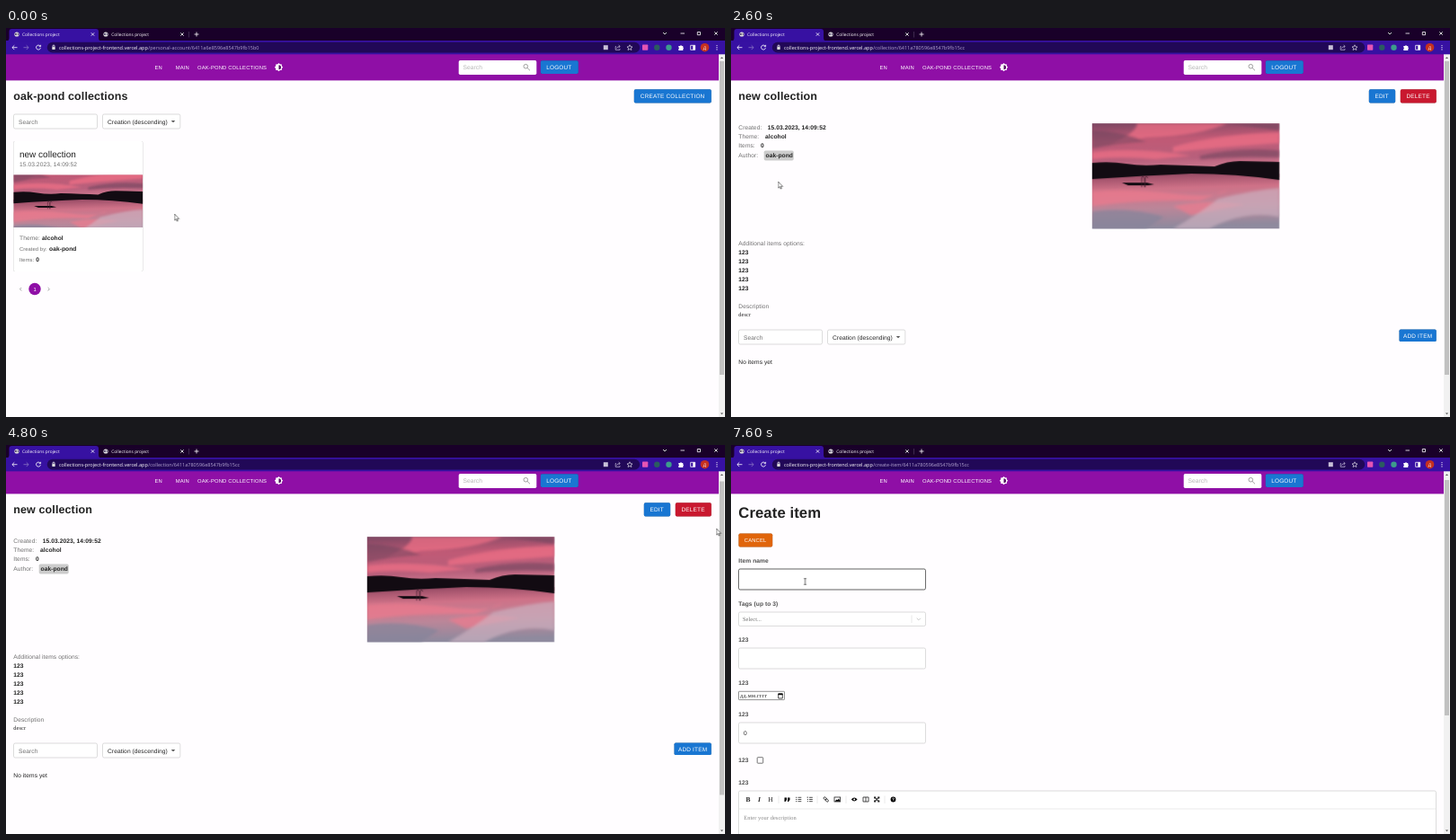
Recreate the animation shown at these times as an HTML page. Size 800x433 px, loop 8000 ms.

```html
<!DOCTYPE html>
<html lang="en">
<head>
<meta charset="utf-8">
<title>Collections project</title>
<style>
@property --scroll { syntax: "<number>"; inherits: true; initial-value: 0; }
html, body { margin: 0; width: 100%; height: 100%; overflow: hidden; background: #fffdff; }
svg.stage { display: block; width: 100vw; height: 100vh; --scroll: 0; animation: scroll 8s linear infinite; }
text { font: 6.667px "Liberation Sans", Arial, sans-serif; letter-spacing: .06px; fill: #222; white-space: pre; }
.ui { font: 4.85px "Open Sans", sans-serif; letter-spacing: 0; fill: #fff; }
.url { font-size: 5.5px; }
.path { fill: #b3a5d0; }
.b { font-weight: 700; }
.dim { fill: #707070; }
.label { font-weight: 700; fill: #505050; }
.h4 { font-size: 12.5px; font-weight: 700; letter-spacing: .11px; }
.h3 { font-size: 16.667px; font-weight: 700; letter-spacing: .1px; }
.h5 { font-size: 10px; letter-spacing: 0; }
.sm { font-size: 5.83px; }
.nav { font-size: 5.83px; letter-spacing: .167px; fill: #fff; }
.btn { font-size: 6.45px; letter-spacing: .18px; fill: #fff; }
.serif { font-family: "Liberation Serif", "Times New Roman", serif; font-size: 6.4px; }
.blue { fill: #1976d2; }
.red { fill: #c9182f; }
.raised { filter: drop-shadow(0 .6px .6px #0006); }
.field { fill: #fff; stroke: #c4c4c4; stroke-width: .6; }
.line { fill: none; stroke: #fff; stroke-width: .8; }
.ink { stroke: #222; }
.grey { stroke: #8a8a8a; }

.scrolled { transform: translateY(calc(var(--scroll) * -1px)); }
.thumb { fill: #c1c1c1; transform: translateY(calc(var(--scroll) * .87px)); }
.list, .spin, .detail, .opened, .form, .early, .arrow, .hand, .beam, .over-edit, .over-add, .over-input
  { animation: 8s step-end infinite; }
.list { animation-name: list; }
.spin { animation-name: spin; }
.detail { animation-name: detail; }
.opened { animation-name: opened; }
.form { animation-name: form; }
.early { animation-name: early; }
.arrow { animation-name: arrow; }
.hand { animation-name: hand; }
.beam { animation-name: beam; }
.over-edit { animation-name: over-edit; }
.over-add { animation-name: over-add; }
.over-input { animation-name: over-input; }
.cursor { animation: move 8s linear infinite; }
.arc { fill: none; stroke: #1976d2; stroke-width: 1.6; transform-origin: 396.5px 75px; animation: arc 8s linear infinite; }

@keyframes scroll {
  0%, 33.75% { --scroll: 0; }
  40%, 48.75% { --scroll: 45.4; }
  50% { --scroll: 39; }
  57.5%, 100% { --scroll: 4; }
}
@keyframes list { 0% { opacity: 1; } 18.75%, 100% { opacity: 0; } }
@keyframes spin { 0% { opacity: 0; } 18.75% { opacity: 1; } 26.25%, 100% { opacity: 0; } }
@keyframes detail { 0% { opacity: 0; } 26.25% { opacity: 1; } 76.25%, 100% { opacity: 0; } }
@keyframes opened { 0% { opacity: 0; } 18.75% { opacity: 1; } 76.25%, 100% { opacity: 0; } }
@keyframes form { 0% { opacity: 0; } 76.25%, 100% { opacity: 1; } }
@keyframes early { 0% { opacity: 1; } 76.25%, 100% { opacity: 0; } }
@keyframes over-edit { 0% { opacity: 0; } 66.25% { opacity: 1; } 71.25%, 100% { opacity: 0; } }
@keyframes over-add { 0% { opacity: 0; } 73.75% { opacity: 1; } 76.25%, 100% { opacity: 0; } }
@keyframes over-input { 0% { opacity: 0; } 88.75%, 100% { opacity: 1; } }
@keyframes arrow {
  0%, 18.75%, 46.25%, 71.25%, 76.25% { opacity: 1; }
  11.25%, 43.75%, 66.25%, 73.75%, 88.75%, 100% { opacity: 0; }
}
@keyframes hand {
  0%, 18.75%, 71.25%, 76.25%, 100% { opacity: 0; }
  11.25%, 66.25%, 73.75% { opacity: 1; }
}
@keyframes beam {
  0%, 46.25% { opacity: 0; }
  43.75%, 88.75%, 100% { opacity: 1; }
}
@keyframes arc {
  0%, 18.75% { transform: rotate(35deg); stroke-dasharray: 30 360; }
  23.75% { transform: rotate(155deg); stroke-dasharray: 200 360; }
  26.25%, 100% { transform: rotate(215deg); stroke-dasharray: 285 360; }
}
@keyframes move {
  0%, 1.25% { transform: translate(187.5px, 207px); }
  5% { transform: translate(268px, 285px); }
  8.75% { transform: translate(160px, 250px); }
  11.25% { transform: translate(140px, 212px); }
  12.5%, 17.5% { transform: translate(72px, 190px); }
  21.25%, 25% { transform: translate(296px, 207px); }
  30% { transform: translate(80px, 176px); }
  32.5%, 40% { transform: translate(52.5px, 171px); }
  45%, 46.25% { transform: translate(73px, 201px); }
  48.75% { transform: translate(790.5px, 134px); }
  50% { transform: translate(790.5px, 128px); }
  57.5%, 61.25% { transform: translate(790.5px, 93px); }
  67.5%, 71.25% { transform: translate(729.5px, 72.5px); }
  72.5% { transform: translate(770px, 395px); }
  75%, 76.25% { transform: translate(764px, 341px); }
  82.5%, 87.5% { transform: translate(150px, 168px); }
  91.25%, 92.5% { transform: translate(90px, 153px); }
  95%, 100% { transform: translate(82.5px, 152px); }
}
</style>
</head>
<body>
<svg class="stage" viewBox="0 0 800 433" preserveAspectRatio="none" text-rendering="geometricPrecision">
<defs>
  <clipPath id="view"><rect y="29" width="793" height="404"/></clipPath>
  <linearGradient id="sky" x2=".15" y2="1">
    <stop stop-color="#7d4763"/><stop offset=".35" stop-color="#c05a76"/>
    <stop offset=".7" stop-color="#b8607c"/><stop offset="1" stop-color="#d9869b"/>
  </linearGradient>
  <linearGradient id="water" x2=".1" y2="1">
    <stop stop-color="#8f4560"/><stop offset=".3" stop-color="#cf7288"/>
    <stop offset=".65" stop-color="#bc8699"/><stop offset="1" stop-color="#8f8a9e"/>
  </linearGradient>
  <filter id="soft"><feGaussianBlur stdDeviation="1.6"/></filter>
  <symbol id="photo" viewBox="0 0 208 117" preserveAspectRatio="xMidYMid slice">
    <rect width="208" height="60" fill="url(#sky)"/>
    <rect y="56" width="208" height="61" fill="url(#water)"/>
    <g filter="url(#soft)">
      <path d="M50 0H150Q120 14 60 16L20 24Q50 10 50 0ZM90 26Q140 12 208 10V22Q150 26 90 32ZM0 32Q50 26 110 36L70 40Q30 36 0 40Z" fill="#ee6f86" opacity=".75"/>
      <path d="M0 8Q30 8 60 20Q30 22 0 28ZM120 36Q160 26 208 30V38Q160 36 120 40ZM150 0H208V8Z" fill="#70435e" opacity=".6"/>
      <path d="M0 76Q40 72 90 78T150 74L120 86Q60 84 0 92ZM90 92Q130 84 170 90L110 102Z" fill="#ee7b8d" opacity=".7"/>
      <path d="M140 84Q180 74 208 72V104Q170 96 130 117H90Q120 100 140 84Z" fill="#cdb2c2" opacity=".65"/>
      <path d="M0 98Q40 92 80 104L60 117H0Z" fill="#85839a" opacity=".7"/>
    </g>
    <path d="M0 44Q20 42 38 45T76 46Q110 47 136 48Q150 42 164 42T208 43V63Q160 56 110 56Q60 58 0 62Z" fill="#120b12"/>
    <path d="M33 66H61L69 68L62 69H40Z" fill="#120b12"/>
    <path d="M55 71V60Q57 58 58 61V71M59 71V60Q61 58 62 61" fill="none" stroke="#43202f" stroke-width=".7"/>
  </symbol>
  <g id="filters">
    <rect class="field" x="8.5" y="96" width="93" height="16" rx="1.7"/>
    <text class="dim" x="14" y="106.7">Search</text>
    <rect class="field" x="107.5" y="96" width="86.3" height="16" rx="1.7"/>
    <text x="113" y="106.5">Creation (descending)</text>
    <path d="M183.7 103h4.6l-2.3 2.3z" fill="#555"/>
  </g>
  <g id="globe">
    <circle r="2.6" fill="#ddd"/>
    <path d="M-1.8-1.2L.2-.6L-.6 1L-2 .5ZM.8-2L2 0L1 1.4Z" fill="#403060"/>
  </g>
  <path id="cross" class="line" d="M-1.7-1.7L1.7 1.7M1.7-1.7L-1.7 1.7"/>
</defs>

<rect width="800" height="433" fill="#fffdff"/>
<g clip-path="url(#view)">
<g class="scrolled">
  <rect y="29" width="793" height="29.4" fill="#8f0fa6"/>
  <text class="nav" x="165.5" y="46">EN</text>
  <text class="nav" x="188.7" y="46">MAIN</text>
  <text class="nav" x="213" y="46">OAK-POND COLLECTIONS</text>
  <g transform="translate(303.5 43.7)">
    <path id="sq" d="M-3.3-3.3H3.3V3.3H-3.3Z" fill="#fff"/>
    <use href="#sq" transform="rotate(45)"/>
    <path d="M0-2.5A2.5 2.5 0 0 1 0 2.5Z" fill="#50085f"/>
  </g>
  <rect x="503.7" y="36" width="86.6" height="16" rx="1.7" fill="#fff"/>
  <text x="508.5" y="45.5" style="fill:#b5b5b5">Search</text>
  <g class="line grey"><circle cx="578.3" cy="42.7" r="2.3"/><path d="M580 44.4L583 47.3"/></g>
  <rect class="blue raised" x="594.8" y="36.2" width="42" height="14.8" rx="1.7"/>
  <text class="btn" x="601.2" y="45.8">LOGOUT</text>

  <g class="list">
    <text class="h4" x="8.3" y="80">oak-pond collections</text>
    <rect class="blue raised" x="698.8" y="68.2" width="86" height="15.2" rx="1.7"/>
    <text class="btn" x="705.8" y="78">CREATE COLLECTION</text>
    <use href="#filters"/>
    <rect class="raised" x="8.3" y="126" width="144" height="145" rx="1.7" fill="#fff"/>
    <text class="h5" x="15" y="143.5">new collection</text>
    <text class="dim" x="15" y="154">15.03.2023, 14:09:52</text>
    <use href="#photo" x="8.3" y="163.5" width="144" height="58.5"/>
    <text class="dim" x="15" y="235.7">Theme:</text><text class="b" x="40" y="235.7">alcohol</text>
    <text class="dim sm" x="15" y="247.7">Created by:</text><text class="b" x="48" y="247.7">oak-pond</text>
    <text class="dim sm" x="15" y="259.7">Items:</text><text class="b" x="33.2" y="259.7">0</text>
    <path class="line grey" d="M17.2 289L15.5 290.7L17.2 292.4M46.7 289L48.4 290.7L46.7 292.4"/>
    <circle cx="32" cy="290.5" r="6.7" fill="#8f0fa6"/>
    <text class="sm" x="30.4" y="292.6" style="fill:#fff">1</text>
  </g>

  <g class="spin">
    <path class="arc" pathLength="360" d="M404.5 75A8 8 0 1 1 388.5 75A8 8 0 1 1 404.5 75"/>
  </g>

  <g class="detail">
    <text class="h4" x="8.3" y="80">new collection</text>
    <rect class="blue raised" x="709.8" y="68.2" width="29.4" height="15.2" rx="1.7"/>
    <rect class="over-edit raised" x="709.8" y="68.2" width="29.4" height="15.2" rx="1.7" fill="#1565c0"/>
    <text class="btn" x="716.5" y="78">EDIT</text>
    <rect class="red raised" x="744.8" y="68.2" width="40" height="15.2" rx="1.7"/>
    <text class="btn" x="751.5" y="78">DELETE</text>
    <text class="dim" x="8.3" y="113.3">Created:</text><text class="b" x="40.8" y="113.3">15.03.2023, 14:09:52</text>
    <text class="dim" x="8.3" y="123.3">Theme:</text><text class="b" x="38" y="123.3">alcohol</text>
    <text class="dim" x="8.3" y="133.3">Items:</text><text class="b" x="33" y="133.3">0</text>
    <text class="dim" x="8.3" y="144">Author:</text>
    <rect x="36.7" y="136.5" width="33" height="11" rx="1.7" fill="#ccc"/>
    <text class="b" x="38.5" y="144">oak-pond</text>
    <use href="#photo" x="401.8" y="106.3" width="208.3" height="116.9"/>
    <text class="dim" x="8.3" y="242">Additional items options:</text>
    <text class="b" y="252"><tspan x="8.3">123</tspan><tspan x="8.3" dy="10">123</tspan><tspan x="8.3" dy="10">123</tspan><tspan x="8.3" dy="10">123</tspan><tspan x="8.3" dy="10">123</tspan></text>
    <text class="dim" x="8.3" y="312.3">Description</text>
    <text class="serif" x="8.3" y="321">descr</text>
    <use href="#filters" y="240"/>
    <rect class="blue raised" x="743.5" y="335.5" width="41.3" height="13.6" rx="1.7"/>
    <rect class="over-add raised" x="743.5" y="335.5" width="41.3" height="13.6" rx="1.7" fill="#1565c0"/>
    <text class="btn" x="748" y="344.5">ADD ITEM</text>
    <text x="8.3" y="374">No items yet</text>
  </g>

  <g class="form"><g transform="translate(0 4)">
    <text class="h3" x="8.3" y="81">Create item</text>
    <rect class="raised" x="8.5" y="98.5" width="37.7" height="15" rx="1.7" fill="#e0650b"/>
    <text class="nav" x="14.8" y="108">CANCEL</text>
    <text class="label" x="8.3" y="131">Item name</text>
    <rect class="field" x="8.5" y="138" width="208" height="23" rx="1.7"/>
    <rect class="over-input line ink" x="8.5" y="138" width="208" height="23" rx="1.7" style="stroke-width:.6"/>
    <text class="label" x="8.3" y="178.7">Tags (up to 3)</text>
    <rect class="field" x="8.5" y="186" width="208" height="15.5" rx="1.7"/>
    <text class="serif dim" x="13" y="195.8">Select...</text>
    <path d="M201 189.5V198" stroke="#ccc" stroke-width=".5"/>
    <path class="line" style="stroke:#bbb" d="M206.7 192.8L208.8 194.9L210.9 192.8"/>
    <text class="label" x="8.3" y="219">123</text>
    <rect class="field" x="8.5" y="226" width="208" height="23" rx="1.7"/>
    <text class="label" x="8.3" y="267">123</text>
    <rect x="8.5" y="274.3" width="51" height="9.3" rx=".7" fill="#fff" stroke="#666" stroke-width=".7"/>
    <text class="serif" x="10" y="281" style="letter-spacing:.2px">дд.мм.гггг</text>
    <path d="M52.7 277H57.3V282H52.7Z" class="line ink"/><path d="M52.5 276.5H57.5V278.2H52.5Z"/>
    <text class="label" x="8.3" y="301.5">123</text>
    <rect class="field" x="8.5" y="309" width="208" height="23" rx="1.7"/>
    <text x="14" y="322.8">0</text>
    <text class="label" x="8.3" y="353.2">123</text>
    <rect class="line" x="29.2" y="347.7" width="6.5" height="6.5" rx=".7" style="stroke:#555"/>
    <text class="label" x="8.3" y="377.5">123</text>
    <rect class="field" x="8.5" y="385" width="776" height="90" rx="1.7"/>
    <path d="M8.5 405H784.5M53 390.5V399M96 390.5V399M128 390.5V399M171 390.5V399" stroke="#ddd" stroke-width=".6"/>
    <text class="serif b" x="16.5" y="397" style="font-size:7.5px">B</text>
    <text class="serif b" x="30" y="397" style="font-size:7.5px;font-style:italic">I</text>
    <text class="serif" x="41.3" y="397" style="font-size:7.5px">H</text>
    <path d="M59.5 392.5H62V395L60.5 397H59.5ZM63 392.5H65.5V395L64 397H63Z"/>
    <path class="line ink" d="M74.5 392.3H78.3M74.5 394.5H78.3M74.5 396.7H78.3M87 392.3H90.8M87 394.5H90.8M87 396.7H90.8"/>
    <path class="line ink" d="M72 392.3H73.3M72 394.5H73.3M72 396.7H73.3M85.2 391.5V393M84.8 394.5H86M84.8 396.7H86"/>
    <g class="line ink" transform="rotate(45 105.7 394.5)"><rect x="102.4" y="393.3" width="3.6" height="2.4" rx="1.2"/><rect x="105.4" y="393.3" width="3.6" height="2.4" rx="1.2"/></g>
    <rect class="line ink" x="115" y="392" width="6.6" height="5"/><path d="M115.5 396.7L117.5 394.5L118.5 395.3L120 393.5L121.3 396.7Z"/>
    <path d="M133.8 394.5Q137.2 390.5 140.6 394.5Q137.2 398.5 133.8 394.5Z"/><circle cx="137.2" cy="394.5" r="1" fill="#fff"/>
    <path class="line ink" d="M147 392H153V397H147ZM150 392V397"/>
    <path class="line ink" style="stroke-width:1.1" d="M159.8 392.1L164.6 396.9M164.6 392.1L159.8 396.9M159.6 393.6V392H161.2M163.2 392H164.8V393.6M159.6 395.4V397H161.2M163.2 397H164.8V395.4"/>
    <circle cx="180.5" cy="394.5" r="2.9"/><text class="b" x="179.1" y="396.3" style="fill:#fff;font-size:4.8px">?</text>
    <text class="serif" x="14.3" y="416.7" style="fill:#888">Enter your description</text>
  </g></g>
</g>
</g>

<rect x="793" y="29" width="7" height="404" fill="#f1f1f1"/>
<path d="M794.9 34H798.1L796.5 32.2ZM794.9 428.5H798.1L796.5 430.3Z" fill="#555"/>
<g class="early"><rect class="thumb" x="794" y="37" width="5" height="349"/></g>
<g class="form"><rect class="thumb" x="794" y="35.5" width="5" height="262"/></g>

<rect width="800" height="14.5" fill="#190029"/>
<rect y="14" width="800" height="15.3" fill="#3711a2"/>
<path d="M1 14.5Q3.5 14 3.5 11V4Q3.5 1 6.5 1H100Q103 1 103 4V11Q103 14 105.5 14.5Z" fill="#3711a2"/>
<use href="#globe" x="12" y="7"/><text class="ui" x="18" y="8.8">Collections project</text><use href="#cross" x="96.5" y="7"/>
<use href="#globe" x="111" y="7"/><text class="ui" x="117.3" y="8.8">Collections project</text><use href="#cross" x="196" y="7"/>
<path d="M203.5 4V10.5" stroke="#665574" stroke-width=".5"/>
<path class="line" d="M209.5 7H214.5M212 4.5V9.5M731 5L733 7L735 5M750.5 6H755M769.3 4.5H772.5V7.7H769.3Z"/>
<use href="#cross" x="790" y="6"/>

<rect x="45.8" y="15.8" width="659.4" height="11.8" rx="5.9" fill="#210857"/>
<path class="line" d="M12.5 21.7H7M9.3 19.3L6.9 21.7L9.3 24.1M38 20A2.5 2.5 0 1 0 38.5 22.2M38.6 18.8V20.7H36.7"/>
<path class="line" style="stroke:#8b76c4" d="M19.5 21.7H25M22.7 19.3L25.1 21.7L22.7 24.1"/>
<rect x="51.3" y="21" width="3.4" height="3" rx=".4" fill="#ddd"/><path class="line" d="M52 21V20A1 1 0 0 1 54 20V21"/>
<text class="ui url" x="59" y="23.6">collections-project-frontend.vercel.app</text>
<text class="ui url path list" x="158.2" y="23.6">/personal-account/6411a6e8596e8547b9fb15b0</text>
<text class="ui url path opened" x="158.2" y="23.6">/collection/6411a780596e8547b9fb15cc</text>
<text class="ui url path form" x="158.2" y="23.6">/create-item/6411a780596e8547b9fb15cc</text>
<rect x="664.8" y="19.2" width="5" height="5" fill="#c8c0d8"/>
<path class="line" style="stroke:#b9afd0" d="M679 20.5H678.2V24.3H683V23M679.5 22.7Q680 20.5 683 20.5M681.7 19L683.3 20.5L681.7 22"/>
<path class="line" style="stroke-width:.6" d="M694 18.8L694.9 20.8L697 21L695.4 22.4L695.9 24.5L694 23.4L692.1 24.5L692.6 22.4L691 21L693.1 20.8Z"/>
<rect x="708" y="18.5" width="6.3" height="6.3" rx=".7" fill="#e554b4"/>
<circle cx="724.3" cy="21.7" r="3.2" fill="#2b5c60"/>
<circle cx="737.5" cy="21.7" r="3.2" fill="#3d9c8c"/>
<path d="M748.3 20H750A1.1 1.1 0 0 1 752 20H753.3V21.5A1.1 1.1 0 0 1 753.3 23.5V25H748.3V23.3A1 1 0 0 0 748.3 21.5Z" fill="#fff"/>
<path class="line" d="M761.7 19.3H766.7V24.3H761.7Z"/><rect x="764.3" y="19.3" width="2.4" height="5" fill="#fff"/>
<circle cx="777.5" cy="21.7" r="4.8" fill="#c5301f"/><text class="ui" x="775.8" y="23.5">Д</text>
<g fill="#fff"><circle cx="791" cy="19.5" r=".6"/><circle cx="791" cy="21.7" r=".6"/><circle cx="791" cy="23.9" r=".6"/></g>

<g class="cursor" stroke-linejoin="round">
  <path class="arrow" d="M0 0V7.2L1.7 5.7L2.8 8.1L3.9 7.6L2.8 5.3H5Z" fill="#fff" stroke="#222" stroke-width=".6"/>
  <path class="hand" d="M-.7 5.5V.9Q0-.2.7.9V3.5L3.3 4.1Q4 4.4 3.9 5.5L3.2 9H-.5L-2.5 5.9Q-2.3 4.7-.7 5.9Z" fill="#fff" stroke="#111" stroke-width=".6"/>
  <path class="beam" d="M-1.3-3.3H1.3M0-3.3V3.3M-1.3 3.3H1.3" fill="none" stroke="#222" stroke-width=".7"/>
</g>
</svg>
</body>
</html>
```
